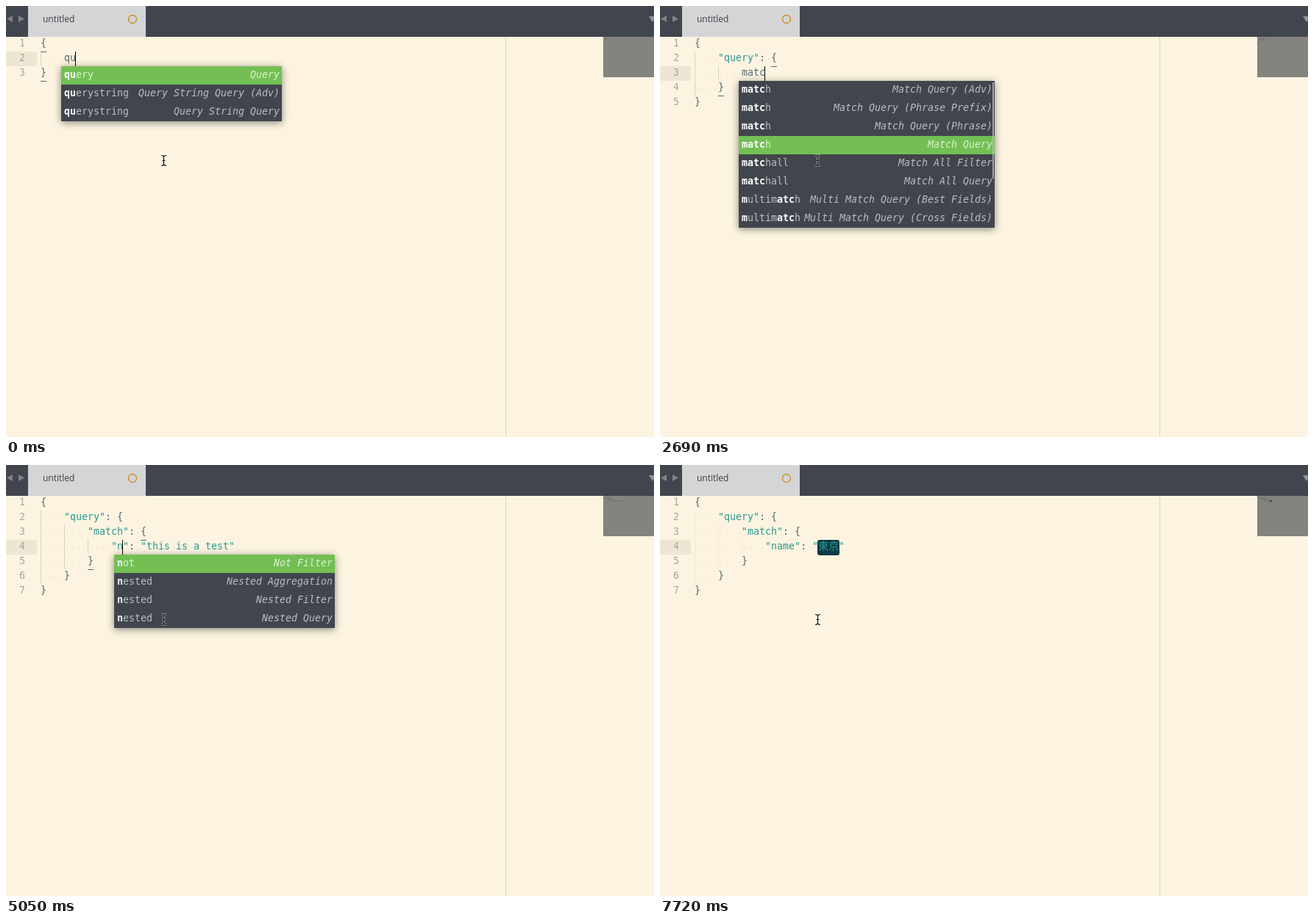
An HTML page with a canvas for the animation above (8000 ms loop, 881x587 px).

```html
<!DOCTYPE html>
<html lang="en">
<head>
<meta charset="utf-8">
<title>Editor completions</title>
<style>
  html, body { margin: 0; width: 100%; height: 100%; overflow: hidden; background: #fcf4e0; }
  canvas { display: block; }
</style>
</head>
<body>
<canvas id="stage" width="881" height="587"></canvas>
<script>
const ctx = document.getElementById("stage").getContext("2d");
const LOOP = 8000, LEFT = 47, TOP = 42, LINE = 20, ROW = 25;
const MONO = '13.29px "DejaVu Sans Mono", monospace';
const WIDE = '14px "Noto Sans CJK JP", "Noto Sans CJK", sans-serif';
const INK = "#536870", TEAL = "#2a9890", DARK = "#41454d", GREEN = "#73bf54";

// Documents: "|" marks the caret, "[...]" the selection.
const outer = body => ["{", "    " + body, "}"];
const inner = body => ["{", '    "query": {', "        " + body, "    }", "}"];
const match = (field, value) => ["{", '    "query": {', '        "match": {',
  `            "${field}": "${value}"`, "        }", "    }", "}"];
const TEST = "this is a test";

const queryMenu = { width: 300, selected: 0, rows: [
  ["query", "Query"],
  ["querystring", "Query String Query (Adv)"],
  ["querystring", "Query String Query"]] };
const matchRows = [
  ["match", "Match Query (Adv)"],
  ["match", "Match Query (Phrase Prefix)"],
  ["match", "Match Query (Phrase)"],
  ["match", "Match Query"],
  ["matchall", "Match All Filter"],
  ["matchall", "Match All Query"],
  ["multimatch", "Multi Match Query (Best Fields)"],
  ["multimatch", "Multi Match Query (Cross Fields)"]];
const matchMenu = (selected, scrollbar) => ({ width: 348, selected, scrollbar, rows: matchRows });
const nestedMenu = { width: 300, selected: 0, rows: [
  ["not", "Not Filter"],
  ["nested", "Nested Aggregation"],
  ["nested", "Nested Filter"],
  ["nested", "Nested Query"]] };

const compose = text => ({ lines: match("name", text + "|"), composing: text });

const timeline = [
  [0, { lines: outer("qu|"), menu: queryMenu }],
  [150, { lines: outer("que|"), menu: queryMenu }],
  [600, { lines: outer('"query": {|}') }],
  [1050, { lines: inner("|") }],
  [1640, { lines: inner("m|"), menu: matchMenu(0, 1) }],
  [1790, { lines: inner("ma|"), menu: matchMenu(0, 1) }],
  [2090, { lines: inner("mat|"), menu: matchMenu(3, 1) }],
  [2240, { lines: inner("matc|"), menu: matchMenu(3, 1) }],
  [2840, { lines: inner("matc|"), menu: matchMenu(3, 0), caret: 0 }],
  [3140, { lines: inner("match|"), menu: matchMenu(3, 1) }],
  [3580, { lines: inner("match|"), menu: matchMenu(3, 0.5), caret: 0.5 }],
  [3730, { lines: inner("match|"), menu: matchMenu(3, 0), caret: 0 }],
  [4020, { lines: inner("match|"), menu: matchMenu(3, 0), caret: 0.5 }],
  [4170, { lines: inner("match|"), menu: matchMenu(3, 0) }],
  [4460, { lines: match("[message]", TEST) }],
  [4910, { lines: match("n|", TEST) }],
  [5050, { lines: match("n|", TEST), menu: nestedMenu }],
  [5200, { lines: match("na|", TEST) }],
  [5350, { lines: match("nam|", TEST) }],
  [5650, { lines: match("name|", TEST) }],
  [5790, { lines: match("name", `[${TEST}]`) }],
  [6390, compose("t")],
  [6540, compose("と")],
  [6680, compose("とう")],
  [6980, compose("とうk")],
  [7130, compose("とうky")],
  [7280, compose("とうきょ")],
  [7430, compose("とうきょう")],
  [7720, { lines: match("name", "[東京]") }]
];

const isWide = char => char > "\u2e80";
const advance = text => [...text].reduce((sum, char) => sum + (isWide(char) ? 14 : 8), 0);

function rect(x, y, w, h, color) {
  ctx.fillStyle = color;
  ctx.fillRect(x, y, w, h);
}

function write(text, x, y, color, font = MONO, align = "left") {
  ctx.font = font;
  ctx.fillStyle = color;
  ctx.textAlign = align;
  ctx.fillText(text, x, y);
}

function triangle(color, ...points) {
  ctx.fillStyle = color;
  ctx.beginPath();
  points.forEach(([x, y]) => ctx.lineTo(x, y));
  ctx.fill();
}

function drawFrame() {
  rect(0, 0, 881, 587, "#fcf4e0");
  rect(679, TOP, 1, 545, "#d9d2c0");
  rect(0, 0, 881, TOP, DARK);
  rect(30, 0, 160, TOP, "#d4d5d7");
  triangle("#7f8388", [1, 17.5], [9, 13], [9, 22]);
  triangle("#7f8388", [25, 17.5], [17, 13], [17, 22]);
  triangle("#90949a", [874, 14], [884, 14], [879, 22]);
  write("untitled", 50, 22, "#3b3d40", '12px "Open Sans", sans-serif');
  ctx.strokeStyle = "#c98b14";
  ctx.lineWidth = 1.3;
  ctx.beginPath();
  ctx.arc(172, 18, 5.5, 0, 7);
  ctx.stroke();
  rect(812, TOP, 69, 55, "#84837e");
}

function drawGuides(line, y, focused) {
  const indent = line.match(/^ */)[0].length / 4;
  const count = line.trim() ? indent : indent - 1;
  for (let level = 0; level < count; level++)
    for (let dy = 0; dy < LINE; dy += 2)
      rect(LEFT + level * 32, y + dy, 1, 1, focused ? "#b5b1a4" : "#e3dcc9");
}

function drawCode(line, y) {
  let x = LEFT, inString = false;
  for (const [run] of line.matchAll(/"|[\u3000-\u9fff]+|[^"\u3000-\u9fff]+/g)) {
    const quote = run === '"';
    write(run, x, y + 13, quote || inString ? TEAL : INK, isWide(run) ? WIDE : MONO);
    if (quote) inString = !inString;
    x += advance(run);
  }
  [...line].forEach((char, i) => {
    if (char === " ") rect(LEFT + advance(line.slice(0, i)) + 4, y + 10, 1, 1, "rgba(150,140,115,.4)");
  });
}

function drawMinimap(line, row) {
  for (const run of line.matchAll(/\S+/g))
    rect(812 + advance(line.slice(0, run.index)) / 10, TOP + row * 2 + 0.5,
      advance(run[0]) / 10, 1, "rgba(50,82,84,.45)");
}

function drawSelection(before, text, row) {
  const x = LEFT + advance(before), width = advance(text);
  ctx.fillStyle = "#0a3a46";
  ctx.beginPath();
  ctx.roundRect(x - 1, TOP + row * LINE, width + 2, 21, 3);
  ctx.fill();
  rect(812 + advance(before) / 10, TOP + row * 2, width / 10, 2, "#1d3f46");
}

// Underlines the innermost pair of braces around the caret.
function drawBracePair(lines, row, column) {
  const text = lines.join("\n");
  const caret = lines.slice(0, row).join("\n").length + (row ? 1 : 0) + column;
  for (const index of [text.lastIndexOf("{", caret - 1), text.indexOf("}", caret)]) {
    const above = text.slice(0, index).split("\n");
    rect(LEFT + advance(above.at(-1)), TOP + above.length * LINE, 8, 1, INK);
  }
}

function drawMenu({ width, selected, scrollbar = 0, rows }, typed, x, y) {
  ctx.save();
  ctx.shadowColor = "rgba(0,0,0,.45)";
  ctx.shadowBlur = 10;
  ctx.shadowOffsetY = 2;
  rect(x, y, width, rows.length * ROW, DARK);
  ctx.restore();
  rows.forEach(([trigger, hint], i) => {
    const top = y + i * ROW, active = i === selected;
    const color = active ? "#dcf2d2" : "#bcbec0";
    if (active) rect(x, top, width, ROW, GREEN);
    let hit = 0;
    [...trigger].forEach((char, k) => {
      const matched = char === typed[hit];
      if (matched) hit++;
      write(char, x + 4 + k * 8, top + 16, matched ? "#fff" : color, matched ? "bold " + MONO : MONO);
    });
    write(hint, x + width - 3, top + 16, color, "italic " + MONO, "right");
  });
  if (scrollbar) rect(x + width - 3, y + 2, 2, 131, `rgba(190,192,195,${scrollbar * 0.75})`);
}

function drawPointer() {
  const beam = new Path2D("M211 203.5q3 0 3.5 2q.5-2 3.5-2M214.5 205V216M211 217.5q3 0 3.5-2q.5 2 3.5 2M212.5 210.5h4");
  for (const [color, width] of [["rgba(255,255,255,.5)", 3], ["#111", 1.2]]) {
    ctx.strokeStyle = color;
    ctx.lineWidth = width;
    ctx.stroke(beam);
  }
}

function drawState({ lines: marked, menu, caret = 1, composing }) {
  const lines = marked.map(line => line.replace(/[|[\]]/g, ""));
  const row = marked.findIndex(line => /[|[]/.test(line));
  const column = marked[row].indexOf("|");
  const focused = column >= 0;
  const y = TOP + row * LINE;

  rect(0, y, 42, LINE, "#ede6d2");
  lines.forEach((line, i) => {
    drawGuides(line, TOP + i * LINE, focused);
    drawMinimap(line, i);
  });
  const selection = marked[row].match(/^(.*)\[(.*)\]/);
  if (selection) drawSelection(selection[1], selection[2], row);
  lines.forEach((line, i) => {
    write(i + 1, 26, TOP + i * LINE + 13, "#9fa8a4", MONO, "right");
    drawCode(line, TOP + i * LINE);
  });

  if (focused) {
    const before = lines[row].slice(0, column), x = LEFT + advance(before);
    drawBracePair(lines, row, column);
    if (composing) rect(x - advance(composing), y + 18, advance(composing), 1, TEAL);
    rect(x - 1, y, 1, LINE, `rgba(0,0,0,${caret})`);
    if (menu) {
      const typed = before.match(/\w*$/)[0];
      drawMenu(menu, typed, x - advance(typed) - 4, y + LINE);
    }
  }
}

function tick() {
  const time = performance.now() % LOOP;
  drawFrame();
  drawState(timeline.findLast(([start]) => start <= time)[1]);
  drawPointer();
  requestAnimationFrame(tick);
}
tick();
</script>
</body>
</html>
```
